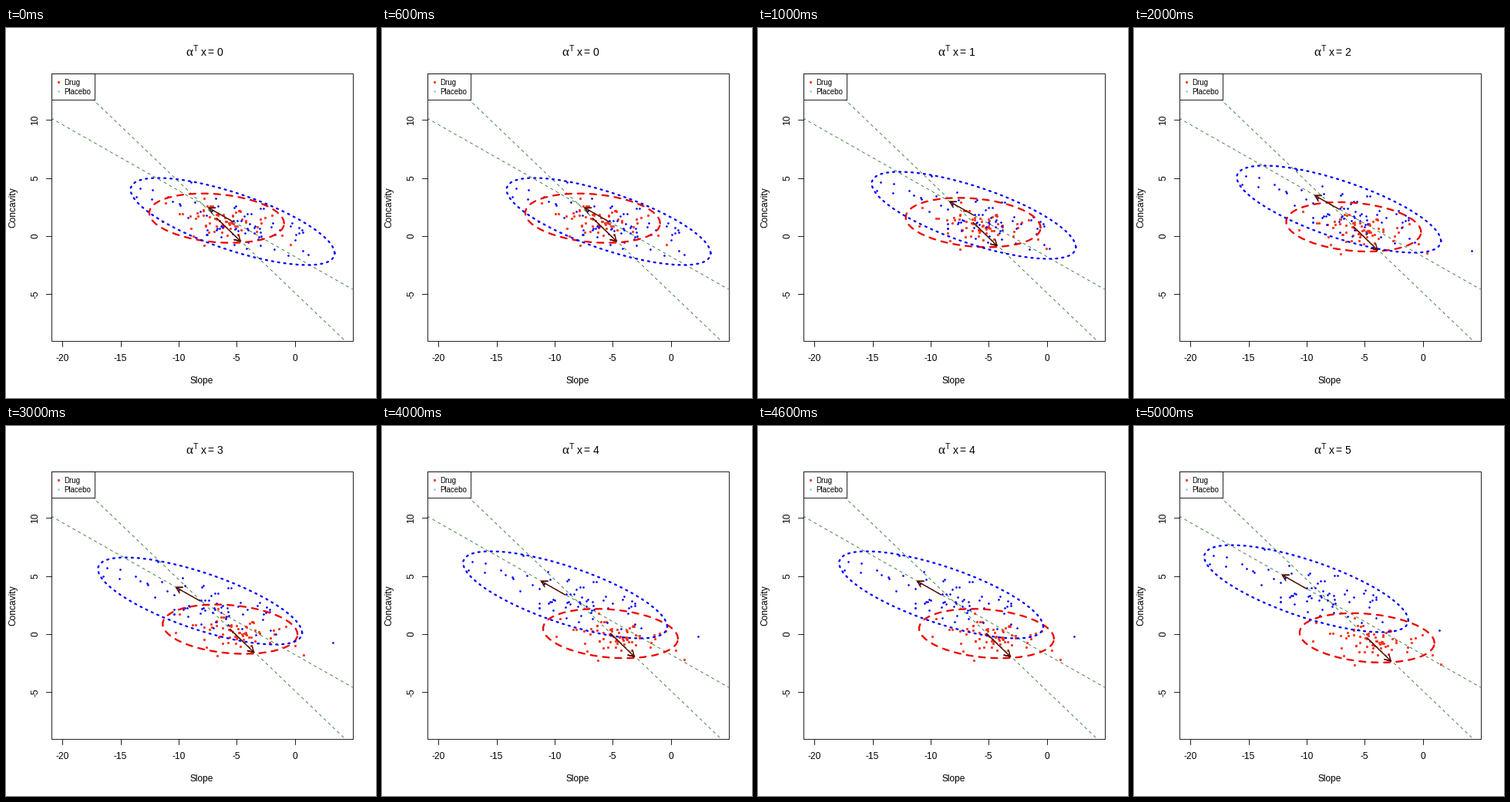
A matplotlib script for the animation above (6000 ms loop, 480 px wide and 480 px high).

```python
import numpy as np
import matplotlib.pyplot as plt
from matplotlib.animation import FuncAnimation
from matplotlib.patches import Rectangle

SIZE, DPI = 480, 96
PT = 72 / DPI            # points per pixel
STEPS = 6
LEFT, TOP, RIGHT, BOTTOM = 59, 59, 450, 406
SANS = "Liberation Sans"
THIN = 0.85

fig = plt.figure(figsize=(SIZE / DPI, SIZE / DPI), dpi=DPI, facecolor="white")
ax = fig.add_axes([0, 0, 1, 1])
ax.set_xlim(0.5, SIZE + 0.5)
ax.set_ylim(SIZE + 0.5, 0.5)
ax.axis("off")

frame = Rectangle((LEFT, TOP), RIGHT - LEFT, BOTTOM - TOP, fill=False,
                  ec="black", lw=THIN * PT, zorder=8)
ax.add_patch(frame)


def sx(x):
    return 375.1 + 15.07 * x


def sy(y):
    return 270.4 - 15.07 * y


def line(xs, ys, color="black", width=THIN, clip=False, dash=None, **kw):
    """Line with width and dash lengths in pixels."""
    if dash:
        kw["dashes"] = [d / width for d in dash]
    item, = ax.plot(xs, ys, color=color, lw=width * PT, **kw)
    if clip:
        item.set_clip_path(frame)
    return item


def label(x, y, text, size=12, ha="center", font=SANS, turn=0):
    return ax.text(x, y, text, fontsize=size * PT, family=font, ha=ha,
                   va="baseline", rotation=turn, rotation_mode="anchor",
                   zorder=10)


class Group:
    """One treatment arm: a tilted normal cloud that slides each step."""

    def __init__(self, mid, step, half_w, half_h, rho):
        self.mid, self.step = np.array(mid), np.array(step)
        self.half_w, self.half_h, self.rho = half_w, half_h, rho

    def contour(self, angle, radius=1.0):
        c, s = radius * np.cos(angle), radius * np.sin(angle)
        lift = self.rho * c - np.sqrt(1 - self.rho**2) * s
        return self.mid + np.column_stack([self.half_w * c,
                                           self.half_h * lift])

    def ring(self):
        return self.contour(np.linspace(0, 2 * np.pi, 52))

    def cloud(self, rng, count, outliers):
        # The ring holds 95 %, so it lies at 2.45 standard deviations.
        radius = np.sqrt(-2 * np.log(1 - 0.91 * rng.random(count))) / 2.45
        angle = 2 * np.pi * rng.random(count)
        return np.vstack([self.contour(angle, radius), outliers])

    def arrow(self, length=35.6, head=8.5):
        """Polyline of a shaft with an open head along the step."""
        d = np.arctan2(self.step[1], self.step[0])
        if self.step[0] > 0:
            length *= 1.21
        tip = self.mid + length * np.array([np.cos(d), np.sin(d)])
        arms = [tip - head * np.array([np.cos(d + a), np.sin(d + a)])
                for a in (-np.pi / 6, np.pi / 6)]
        return np.array([self.mid, tip, arms[0], tip, arms[1]])


blue = Group((294.5, 251.5), (-14.1, -8.0), 132.5, 56.5, 0.73)
red = Group((273.8, 247.2), (5.8, 5.63), 87.5, 32.0, 0.21)

rng = np.random.default_rng(12)
blue_pts = blue.cloud(rng, 68, [(466.5, 305), (169, 219), (174, 208),
                                (240, 200)])
red_pts = red.cloud(rng, 66, [(369, 281), (257, 282), (358, 269)])

# Axes and labels
for v in range(-20, 1, 5):
    line([sx(v)] * 2, [BOTTOM, BOTTOM + 7])
    label(sx(v), 433, str(v))
for v in range(-5, 11, 5):
    line([LEFT - 7, LEFT], [sy(v)] * 2)
    label(42, sy(v), str(v), turn=90)
label(254.5, 462, "Slope")
label(12.5, 233, "Concavity", turn=90)

# Title
label(233.5, 37, "\u03b1", 17, "left", "Liberation Serif")
label(243, 30, "T", 10.5, "left")
label(253, 37, "x", 14, "left")
count = label(263, 37, "= 0", 14, "left")

# Direction lines
GUIDE = dict(color="#2a702a", clip=True, dash=(4, 4), zorder=2)
line([LEFT, RIGHT], [117.5, 339.5], **GUIDE)
line([77.5, 440], [TOP, BOTTOM], **GUIDE)

# Legend
ax.add_patch(Rectangle((LEFT, TOP), 56, 34, fc="white", ec="black",
                       lw=THIN * PT, zorder=9))
label(76, 74, "Drug", 9.7, "left")
label(76, 86, "Placebo", 9.7, "left")
RED_DOT = dict(marker="o", ms=2.4 * PT, mfc="#ff4a20", mec="#f01808",
               mew=0.7 * PT, ls="none")
BLUE_DOT = dict(marker="D", ms=2.1 * PT, mew=0.3 * PT, ls="none")
line([68], [70.5], zorder=10, **RED_DOT)
line([68], [82.5], "#9cc9e0", zorder=10, **BLUE_DOT)

# Moving parts: (artist, coordinates at step 0, shift per step)
RING = dict(width=2.3, dash_capstyle="round", clip=True, zorder=5)
ARROW = dict(color="#551000", width=1.5, clip=True, zorder=6,
             solid_capstyle="round", solid_joinstyle="round")
parts = [
    (line([], [], clip=True, zorder=3, **RED_DOT), red_pts, red.step),
    (line([], [], "#0000ff", clip=True, zorder=4, **BLUE_DOT),
     blue_pts, blue.step),
    (line([], [], "#ee0000", dash=(8, 8), **RING), red.ring(), red.step),
    (line([], [], "#0000ff", dash=(2, 6), **RING), blue.ring(), blue.step),
    (line([], [], **ARROW), red.arrow(), red.step),
    (line([], [], **ARROW), blue.arrow(), blue.step),
]


def update(n):
    for item, base, step in parts:
        item.set_data(*(base + n * step).T)
    count.set_text(f"= {n}")
    return [p[0] for p in parts] + [count]


anim = FuncAnimation(fig, update, frames=STEPS, interval=1000,
                     init_func=lambda: update(0), repeat=True,
                     repeat_delay=0, blit=False)
plt.show()
```
